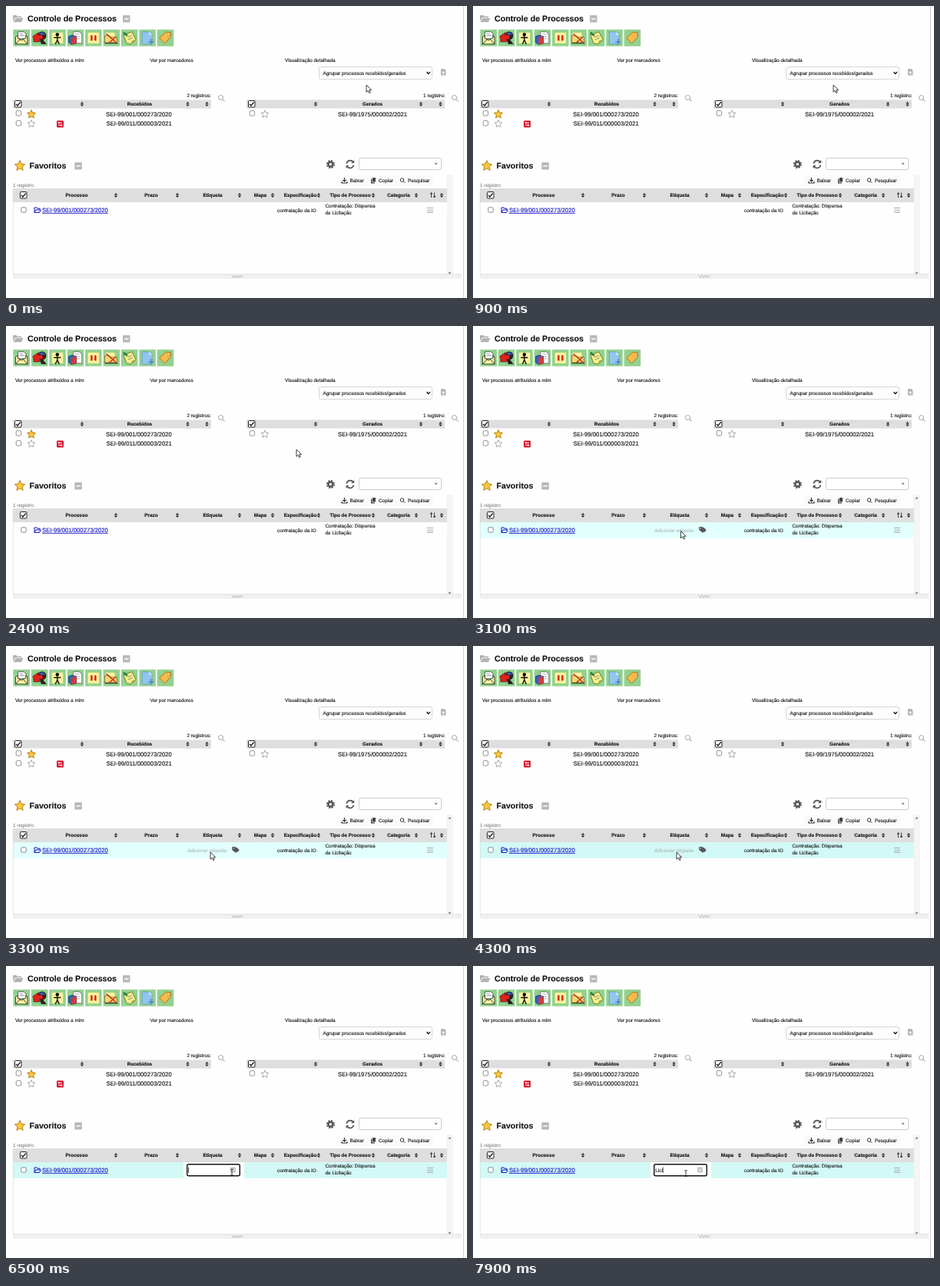
These frames come from a looping animation (600x381 px, 8000 ms). An HTML page:

```html
<!DOCTYPE html>
<html lang="pt-BR">
<head>
<meta charset="utf-8">
<title>Controle de Processos</title>
<style>
  html, body { margin: 0; width: 100%; height: 100%; overflow: hidden; background: #fefefe; }
  svg { display: block; width: 600px; height: 381px; }
  text { font: 6.4px "Liberation Sans", Arial, sans-serif; fill: #111; stroke: #111; stroke-width: .12; text-rendering: geometricPrecision; }
  .h { font-weight: bold; text-anchor: middle; }
  .title { font-size: 10.65px; font-weight: bold; }
  .id { font-size: 7.73px; }
  .link { fill: #1414c8; stroke: #1414c8; text-decoration: underline; }
  .end { text-anchor: end; }
  .hint { font-style: italic; fill: #a2aaaa; stroke: none; }
  .bar { fill: #dedede; }
  .line { fill: none; stroke: #d2d2d2; }
  .ink { fill: none; stroke: #111; stroke-width: .8; }
</style>
</head>
<body>
<svg viewBox="0 0 600 381">
  <defs>
    <path id="star" d="M0-5.5 1.6-1.9 5.5-1.5 2.6 1.2 3.4 5 0 3-3.4 5-2.6 1.2-5.5-1.5-1.6-1.9Z" stroke-linejoin="round"/>
    <path id="sort" d="M-2.2-.6 0-3 2.2-.6ZM-2.2.6 0 3 2.2.6Z" fill="#222"/>
    <g id="all"><rect x=".5" y=".5" width="8.5" height="8.5" rx="1" fill="#fff" stroke="#222"/><path d="M2 5 4 7 7.7 2.3" fill="none" stroke="#111" stroke-width="1.3"/></g>
    <rect id="box" x=".5" y=".5" width="6.4" height="6.4" rx="1.2" fill="#fff" stroke="#777" stroke-width=".8"/>
    <g id="lens" fill="none" stroke-width="1.2"><circle r="3"/><path d="M2.2 2.2 5 5"/></g>
    <g id="minus"><rect width="9.5" height="9.5" rx="1.2" fill="#b9b9b9"/><path d="M2 4.8h5.5" stroke="#fff" stroke-width="1.4"/></g>
    <path id="tag" d="M0 0h4.5l4 4-3.7 4L0 4ZM6 .4 10 4.3 6.6 8" stroke-linejoin="round"/>
  </defs>

  <path d="M595.5 0v381" class="line"/>

  <!-- page title and toolbar -->
  <path d="M9 20V12h4.5l1.2 1.5H20V15H12ZM12.5 15.8h10L20 21H9.8Z" fill="#b3b3b3"/>
  <text x="28" y="20.3" class="title">Controle de Processos</text>
  <use href="#minus" x="152" y="12"/>
  <g id="toolbar"></g>

  <text x="12" y="73">Ver processos atribuídos a mim</text>
  <text x="187.500" y="73">Ver por marcadores</text>
  <text x="363" y="73">Visualização detalhada</text>
  <rect x="407.500" y="79.500" width="147" height="16" rx="2" fill="#fdfdfd" stroke="#d5d5d5"/>
  <text x="412.500" y="89.600">Agrupar processos recebidos/gerados</text>
  <path d="M547.500 86 549.700 88.500 552 86" fill="none" stroke="#111" stroke-width="1.200"/>
  <path d="M566 82h4.500l2 2v6.500H566Z" fill="#b5b5b5"/><path d="M567.500 87h3.500M569.200 85v4" stroke="#fff"/>

  <!-- received / generated -->
  <text x="267" y="119.300" class="end">2 registros:</text>
  <text x="571.500" y="119.300" class="end">1 registro:</text>
  <g stroke="#b5b5b5"><use href="#lens" x="279.500" y="119.500"/><use href="#lens" x="583.500" y="119.500"/></g>
  <path class="bar" d="M9 122.500h258V133.500H9ZM313 122.500h258V133.500H313Z"/>
  <use href="#all" x="11" y="123"/><use href="#all" x="315" y="123"/>
  <text x="174" y="130.300" class="h">Recebidos</text>
  <text x="477" y="130.300" class="h">Gerados</text>
  <g id="sorts"></g>
  <use href="#box" x="12.700" y="136.200"/><use href="#box" x="12.700" y="149.200"/><use href="#box" x="316.700" y="136.200"/>
  <use href="#star" x="33" y="141" fill="#fcc63c" stroke="#b88316"/>
  <g fill="#fff" stroke="#888" stroke-width=".8"><use href="#star" transform="translate(33 153.500) scale(.88)"/><use href="#star" transform="translate(337 141) scale(.88)"/></g>
  <rect x="66" y="149.500" width="9" height="9" rx="1.500" fill="#d8142c"/>
  <path d="M68 152.500h5M68 155.500h5M69.500 151 68 152.500l1.500 1.500M71.500 154l1.500 1.500-1.500 1.500" fill="none" stroke="#fff" stroke-width=".9"/>
  <text x="130" y="143.500" class="id">SEI-99/001/000273/2020</text>
  <text x="130.500" y="156" class="id">SEI-99/011/000003/2021</text>
  <text x="432" y="143.500" class="id">SEI-99/1975/000002/2021</text>

  <!-- favourites -->
  <use href="#star" transform="translate(18 208.300) scale(1.22)" fill="#fcc63c" stroke="#b88316" stroke-width=".8"/>
  <text x="30.500" y="212.200" class="title">Favoritos</text>
  <use href="#minus" x="89.300" y="204"/>
  <g fill="none" stroke="#555"><circle cx="422.400" cy="206.500" r="3" stroke-width="2.400"/><circle cx="422.400" cy="206.500" r="4.800" stroke-width="1.600" stroke-dasharray="2.200 1.570"/>
    <path d="M443.500 205.500a4.600 4.600 0 0 1 8.300-2M452.300 207.500a4.600 4.600 0 0 1-8.300 2" stroke-width="1.700"/></g>
  <path d="M453.200 201v4h-4ZM442.600 212v-4h4Z" fill="#555"/>
  <rect x="459.500" y="198.500" width="107" height="15" rx="2" fill="#fff" stroke="#ccc"/>
  <path d="M557.500 204.800h4.400L559.700 207.600Z" fill="#888"/>
  <rect x="431" y="221" width="126" height="14" rx="2" fill="#fafafa"/>
  <path d="M437 229v2h7v-2M440.500 224v4.500M438.300 226.800l2.200 2.200 2.200-2.200" fill="none" stroke="#333" stroke-width="1.200"/>
  <path d="M477 224h4v5.500h-4ZM475 225.500h1.400v4.700h3.500v1.300H475Z" fill="#444"/>
  <use href="#lens" transform="translate(515.500 227) scale(.75)" stroke="#222" stroke-width="1.700"/>
  <text x="447.500" y="230.300">Baixar</text><text x="485" y="230.300">Copiar</text><text x="523" y="230.300">Pesquisar</text>
  <text x="9" y="236.300" style="fill:#666;stroke:none">1 registro:</text>

  <rect x="573" y="220" width="9" height="130" fill="#f5f5f5"/>
  <path d="M575.500 347.500h4L577.500 350Z" fill="#777"/>
  <path id="scrollUp" d="M575.500 225.500h4L577.500 223Z" fill="#777"/>
  <path class="bar" d="M9 238.500h565V255.500H9Z"/>
  <path d="M9 238.500h565M9 255.500h565" stroke="#d4d4d4" stroke-width=".6"/>
  <use href="#all" x="18" y="242"/>
  <g id="columns"></g>
  <path d="M553.500 250v-6M552 245.500l1.500-2 1.500 2M557.500 243.500v6M556 248l1.500 2 1.500-2" class="ink"/>

  <rect id="row" x="9" y="256" width="565" height="21"/>
  <path d="M9.300 238v112" class="line" stroke-width=".6"/>
  <use href="#box" x="19.300" y="262.300"/>
  <path d="M37 269.500v-6.500h3l1 1.200h3v1.600M37 269.500l1.800-3.500h6.400l-1.700 3.500Z" fill="none" stroke="#1414c8"/>
  <text x="47" y="269" class="id link">SEI-99/001/000273/2020</text>
  <text x="353" y="268.500">contratação da IO</text>
  <text x="415.500" y="263.400">Contratação: Dispensa</text><text x="415.500" y="271.600">de Licitação</text>
  <path d="M548 263.500h8M548 266.300h8M548 269.100h8" stroke="#aaa" stroke-width="1.100"/>

  <g id="hint">
    <rect id="tagHover" x="290" y="259" width="19" height="15" rx="2" fill="#dce9e9"/>
    <text x="236" y="268.500" class="hint">Adicionar etiqueta</text>
    <g transform="translate(294.500 262.300) scale(.9)"><use href="#tag" fill="#555" stroke="#555" stroke-width=".6"/><circle cx="2" cy="2" r=".8" fill="#fff"/></g>
  </g>
  <g id="tooltip">
    <rect x="233.500" y="252.500" width="59" height="15" rx="2" fill="#000" opacity=".18"/>
    <rect x="232.500" y="251.500" width="59" height="14.500" rx="2" fill="#fdfba6" stroke="#d9d68c" stroke-width=".8"/>
    <text x="236.800" y="261">Adicionar etiqueta</text>
  </g>
  <g id="editor">
    <rect x="231" y="256" width="79" height="21" fill="#fefefe"/>
    <rect x="235.700" y="258.700" width="68.600" height="15" rx="2" fill="#fff" stroke="#111" stroke-width="1.400"/>
    <rect x="292" y="262.500" width="7" height="7" rx="1" fill="#c4c4c4"/>
    <path d="M293.500 266 295 267.500 297.700 264.500" fill="none" stroke="#fff"/>
    <text id="typed" x="237.300" y="268.500"></text>
    <path id="caret" d="M0 262.500v7.500" class="ink"/>
  </g>

  <path d="M9 350h584v6H9Z" fill="#f1f1f1"/><path d="M9 350h584" class="line" stroke-width=".6"/>
  <path d="M294 351.500l2 3 2-3 2 3 2-3 2 3 2-3 2 3" fill="none" stroke="#aaa" stroke-width=".8"/>

  <g id="pointer">
    <path id="arrow" d="M0 0v9.300L2.200 7.300 3.700 10.600 5.200 9.900 3.800 6.700H6.600Z" fill="#fff" stroke="#111" stroke-width=".8"/>
    <path id="hand" d="M-1 .8Q0-.6 1 .8V4.600L5 5.600Q6 6 5.800 7.500L5 11.800H-.6L-3.600 7.800Q-3.800 6.300-2.200 6.800L-1 8Z" fill="#fff" stroke="#111" stroke-width=".9"/>
    <path id="beam" d="M-1.800-3.500Q0-3.500 0-2.500 0-3.500 1.800-3.500M0-2.500v6M-1.800 4.500Q0 4.500 0 3.500 0 4.500 1.800 4.500" class="ink"/>
  </g>
</svg>
<script>
const $ = id => document.getElementById(id);
const show = (id, on) => $(id).style.display = on ? '' : 'none';

const note = '<path d="M3.500 4h14.500v14H3.500Z" fill="#fbf29a"/>';
const icons = [
  '<path d="M6 3h8l2.500 2.500V12H6Z" fill="#fff" stroke="#333" stroke-width=".7"/><path d="M8 6h5M8 8h7" stroke="#777" stroke-width=".7"/><path d="M3 9.500 6 8v3.500l4.500 2.500 6-3V8l2 1.500V19H3Z" fill="#fbf3a4" stroke="#222" stroke-width=".8"/><path d="M3 19l5.500-6M18.500 19l-5.500-6" class="ink"/>',
  '<circle cx="14" cy="8" r="5.500" fill="#222"/><path d="M10 6q4-5 8 0-3 3-8 0" fill="#3565b5"/><path d="M2 9 9 4v3h6v6h-4v3H3V12Z" fill="#e0231e" stroke="#400" stroke-width=".6"/><path d="M11 13h4l5 6h-7Z" fill="#222"/>',
  note + '<circle cx="10.500" cy="6.500" r="2.200"/><path d="M10.500 8.500v5.500M6 10.500h9M10.500 13.500l-2.500 5.500M10.500 13.500l2.500 5.500" fill="none" stroke="#111" stroke-width="1.500"/>',
  '<path d="M8 3h8l3 3v12H8Z" fill="#fff" stroke="#555" stroke-width=".7"/><path d="M10 6h6M13 9h4M13 12h4" stroke="#999" stroke-width=".7"/><path d="M2 9l4-1.500 6 1.500v9l-6 1.500L2 17Z" fill="#3b61c4" stroke="#113" stroke-width=".7"/><path d="M6 10.500 12 9v9l-6 1.500Z" fill="#d83a36"/>',
  note + '<path d="M7 7.500h2.500v7H7ZM12 7.500h2.500v7H12Z" fill="#d9271e"/>',
  '<path d="M3 4h12v6H3Z" fill="#fbf29a"/><path d="M2 17V8h6l1.500 2H18v7Z" fill="#f5d774" stroke="#765c15" stroke-width=".7"/><path d="M4 5.500 17 17M16 10 8 17" stroke="#c52b20" stroke-width="1.400"/><path d="M2 18h17" class="ink"/>',
  '<path d="M3 7l11-4 5 10-6 6-6-1Z" fill="#f8ee8b" stroke="#4d6d20" stroke-width=".8"/><path d="M8 10l6-2M9 13l6-2" stroke="#777" stroke-width=".8"/><path d="M3 4l5 4" stroke="#2a7a3a" stroke-width="2.500"/><path d="M13 19l1-4 5-2" fill="#a69b3f"/>',
  '<path d="M4 3h9l4 4v12H4Z" fill="#92c5ee" stroke="#5b93c4" stroke-width=".7"/><path d="M13 3v4h4" fill="#d8ecfb"/><path d="M12 16h7M15.500 12.500v7" stroke="#4c87c8" stroke-width="1.500"/>',
  '<path d="M3 11 11 3.500h6.500V10L10 18Z" fill="#f5ba4b" stroke="#a76f13" stroke-width=".9"/><circle cx="15" cy="6" r="1.300" fill="#fff" stroke="#a76f13" stroke-width=".5"/>'
];
$('toolbar').innerHTML = icons.map((art, i) =>
  `<g transform="translate(${9.5 + i * 23.4} 30.7)"><rect width="21.500" height="21.800" fill="#92d18e"/>${art}</g>`).join('');

const sortAt = (x, y) => `<use href="#sort" x="${x}" y="${y}"/>`;
$('sorts').innerHTML = [99, 236.5, 261.5, 403, 540, 565.5].map(x => sortAt(x, 128)).join('');
const columns = [['Processo', 92, 143], ['Prazo', 189, 223], ['Etiqueta', 269, 304], ['Mapa', 331, 347],
  ['Especificação', 383, 407], ['Tipo de Processo', 448, 478], ['Categoria', 511, 534], ['', 556, 567]];
$('columns').innerHTML = columns.map(([name, x, sortX]) =>
  `<text x="${x}" y="249.300" class="h">${name}</text>` + sortAt(sortX, 247)).join('');

// Linear interpolation through [time, ...values] keys.
function track(keys, t) {
  const i = keys.findIndex(k => k[0] > t);
  if (i < 0) return keys[keys.length - 1].slice(1);
  const a = keys[Math.max(0, i - 1)], b = keys[i];
  const p = i ? (t - a[0]) / (b[0] - a[0]) : 0;
  return a.slice(1).map((v, n) => v + (b[n + 1] - v) * p);
}

const pointerPath = [[0, 469, 103], [900, 469, 103], [1800, 454, 107], [2100, 428, 125], [2400, 378, 161],
  [2700, 306, 243], [2900, 275, 266], [3300, 266, 269], [3600, 265, 269], [5400, 265, 269], [5600, 297, 268],
  [6400, 297, 268], [6800, 285, 270], [7400, 285, 270], [7700, 277, 270]];
const rowColor = [[2700, 254, 254, 254], [3000, 225, 255, 252], [3600, 225, 255, 252], [4000, 210, 249, 246]];
const keyTimes = [7500, 7600, 7800, 7900];
const letterEnds = [237.6, 241.2, 242.6, 245.8, 247.2];

function render(t) {
  const hover = t >= 2800, editing = t >= 6400, onTag = t >= 5500 && !editing;
  const [x, y] = track(pointerPath, t);
  $('pointer').setAttribute('transform', `translate(${x} ${y})`);
  show('arrow', !onTag && !editing);
  show('hand', onTag);
  show('beam', editing);
  $('row').setAttribute('fill', `rgb(${track(rowColor, t).map(Math.round)})`);
  show('scrollUp', hover);
  show('hint', hover && !editing);
  show('tagHover', onTag);
  show('tooltip', t >= 5600 && !editing);
  show('editor', editing);
  const count = keyTimes.filter(k => k <= t).length;
  $('typed').textContent = 'Lici'.slice(0, count);
  $('caret').setAttribute('transform', `translate(${letterEnds[count]} 0)`);
  show('caret', count || t < 7100);
}

function tick() {
  render(Math.floor(performance.now() % 8000 / 100) * 100);
  requestAnimationFrame(tick);
}
tick();
</script>
</body>
</html>
```
